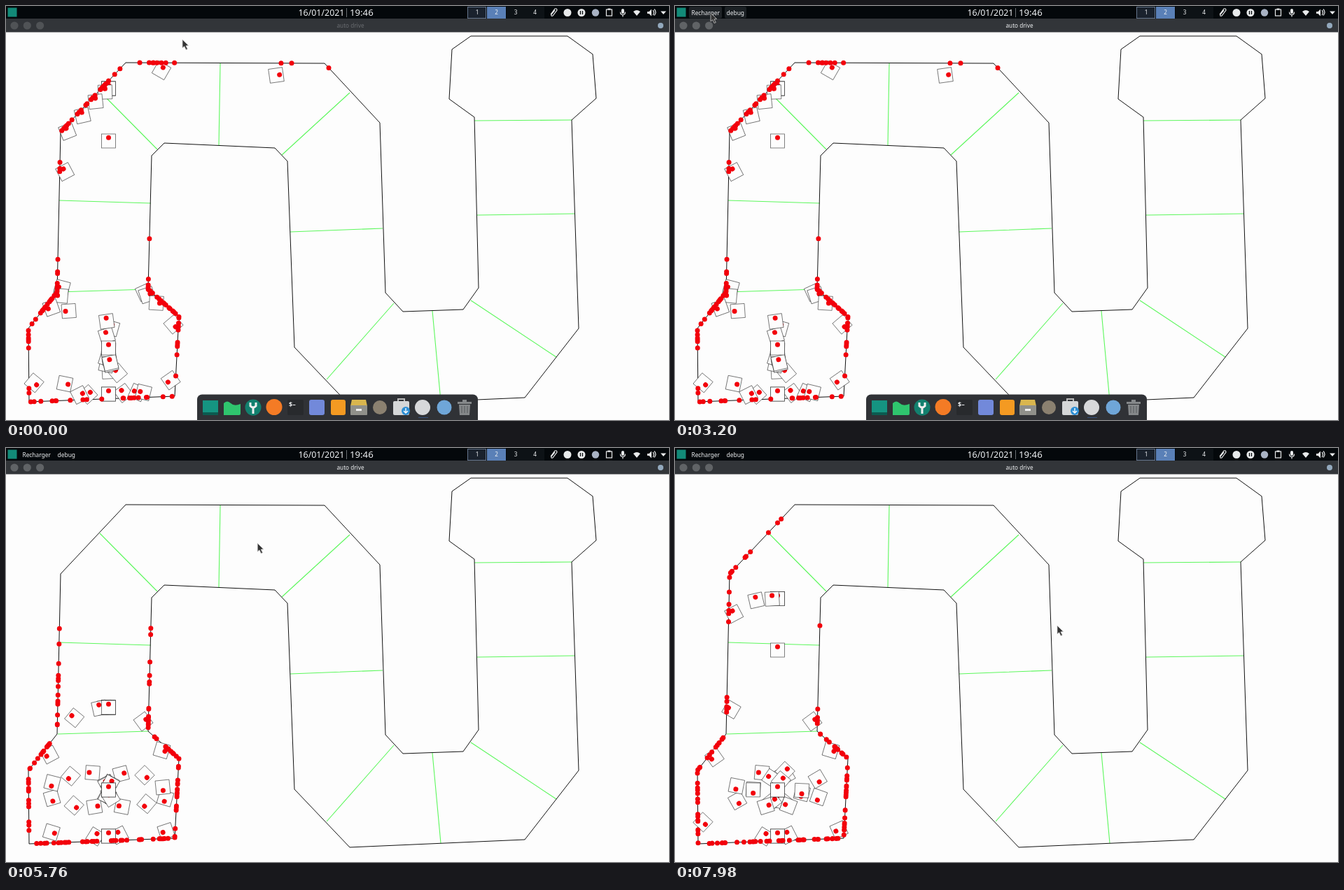
Animation of 947 by 592 pixels, one loop 8 s. Source, as an HTML page:

```html
<!DOCTYPE html>
<html lang="fr">
<head>
<meta charset="utf-8">
<title>auto drive</title>
<style>
  html, body { margin: 0; width: 100%; height: 100%; overflow: hidden; background: #fdfdfd; }
  svg { display: block; width: 100%; height: 100%; }
  text { font-family: "Noto Sans", "Open Sans", sans-serif; fill: #eef0f2; }
  .mid { text-anchor: middle; }
  .car rect { fill: #fdfdfd; stroke: #000; stroke-opacity: .62; stroke-width: .8; }
  .car circle { fill: #f2000b; }
</style>
</head>
<body>
<svg viewBox="0 0 947 592">
  <rect width="947" height="592" fill="#fdfdfd"/>
  <path id="gates" fill="none" stroke="#5cf75c" stroke-width="1.1"/>
  <path id="walls" fill="none" stroke="#111"/>
  <g id="cars" class="car"></g>
  <path id="hits" fill="none" stroke="#f2000b" stroke-width="7" stroke-linecap="round"/>

  <g id="dock">
    <rect x="273" y="555.5" width="401" height="44" rx="7" fill="#303236"/>
    <rect x="281" y="564" width="22" height="21" fill="#159481"/>
    <rect x="281" y="581" width="22" height="4" fill="#0c5b50"/>
    <path d="M311 585V568q5-5 10 0t14 1v14q0 2-2 2z" fill="#2fc56e"/>
    <circle cx="353" cy="574" r="11.5" fill="#12806e"/>
    <path d="M349 567v5q4 4 8 0v-5M353 574v9" fill="none" stroke="#eee" stroke-width="3"/>
    <circle cx="383" cy="573.5" r="11.5" fill="#f47b25"/>
    <rect x="402" y="563" width="23" height="22" rx="2" fill="#282a2d"/>
    <text x="404" y="573" font-size="9" font-weight="700">$–</text>
    <rect x="433" y="563" width="22" height="22" rx="3" fill="#7289da"/>
    <rect x="464" y="563" width="21" height="22" rx="3" fill="#f49a22"/>
    <path d="M494 563h20l2 9h-24z" fill="#d9b64e"/>
    <rect x="492" y="571" width="24" height="14" rx="1" fill="#90908a"/>
    <rect x="500" y="576" width="8" height="3" fill="#eee"/>
    <circle cx="534" cy="574" r="10" fill="#8b8170"/>
    <path d="M560 566v-4h9v4" fill="none" stroke="#bbb" stroke-width="2"/>
    <rect x="553" y="565" width="23" height="20" rx="2" fill="#d5d7d8"/>
    <circle cx="571" cy="579" r="6" fill="#2d8fd5"/>
    <path d="M571 575v7m-3-3 3 3 3-3" fill="none" stroke="#fff" stroke-width="1.4"/>
    <circle cx="595" cy="574" r="11" fill="#d7d8da"/>
    <circle cx="626" cy="574" r="10.5" fill="#6fa6d8"/>
    <path d="M645 566h20v3h-20zM652 563h6v3h-6zM647 570h16l-1 15h-14z" fill="#85888a"/>
    <path d="M651 572v10m4-10v10m4-10v10" stroke="#55585a"/>
    <path d="M589 588.5h14" stroke="#35507c"/>
  </g>

  <rect width="947" height="18.5" fill="#04080b"/>
  <rect y="18" width="947" height="19.5" fill="#323539"/>
  <g id="lights">
    <circle cx="12" cy="28" r="5.6"/><circle cx="30.3" cy="28" r="5.6"/><circle cx="48.6" cy="28" r="5.6"/>
  </g>
  <text id="title" class="mid" x="492" y="30.5" font-size="8.2">auto drive</text>
  <circle cx="935" cy="28" r="4" fill="#93a9bd"/>

  <rect x="2.5" y="2.5" width="13" height="13" fill="#128a78"/>
  <g id="menu" font-size="8.4">
    <rect id="hotA" x="20" y="1" width="47" height="16.5" rx="2" fill="#30353a"/>
    <rect id="hotB" x="71" y="1" width="31" height="16.5" rx="2" fill="#30353a"/>
    <text class="mid" x="43.7" y="12.5">Recharger</text>
    <text class="mid" x="86.3" y="12.5">debug</text>
  </g>
  <text x="417.5" y="14.2" font-size="12.4">16/01/2021</text>
  <text x="491" y="14.2" font-size="13.2">19:46</text>
  <path d="M486.5 3v13" stroke="#85898c" stroke-width=".8"/>
  <rect x="659.5" y="1.5" width="26" height="16" fill="#1a222d" stroke="#65758c"/>
  <rect x="687" y="1" width="27" height="17" fill="#5a80b7"/>
  <rect x="715" y="1" width="54" height="17" fill="#0d1216"/>
  <g class="mid" font-size="8.2">
    <text x="673" y="12.3">1</text><text x="700.5" y="12.3">2</text><text x="728" y="12.3">3</text><text x="755.5" y="12.3">4</text>
  </g>
  <g fill="none" stroke="#e8eaeb" stroke-width="1.2">
    <path d="M778 12l6-8q3-1 3 2l-6 8q-3 1-2-2l5-6"/>
    <rect x="857.5" y="5" width="8" height="9"/><path d="M859.5 4.5h4" stroke-width="2"/>
    <path d="M877.5 8.5q0 4 3.5 4t3.5-4M881 12.5v3"/>
    <path d="M924 6q3 3.5 0 7M926 4.5q4 4.5 0 9"/>
  </g>
  <g fill="#e8eaeb">
    <circle cx="802" cy="9.5" r="5.5"/>
    <circle cx="822" cy="9.5" r="5.5"/>
    <circle cx="842" cy="9.5" r="5.2" fill="#a9b3c4"/>
    <rect x="879" y="4" width="4" height="7" rx="2"/>
    <path d="M896 8q5-4 10 0l-5 6zM916 8h2.5l3.500-3.500v10l-3.500-3.500h-2.500zM935 7.500h8l-4 4.500z"/>
  </g>
  <path d="M820.5 7v5m3-5v5" stroke="#04080b" stroke-width="1.3"/>

  <path id="mouse" d="M0 0v12l2.700-2.300 2.400 4.800 2.200-1-2.400-4.600 3.700-.4z" fill="#333" stroke="#ccc" stroke-width=".8"/>
</svg>
<script>
const $ = id => document.getElementById(id);
const LOOP = 8000, RELOAD = 4075, SPEED = 70, RAD = Math.PI / 180;
const RANGE = 138;      // sensor length
const CLEARANCE = 7.5;  // a car this close to a wall has crashed
const START = [146.5, 489];

const track = [
  [33, 566], [32, 461], [73, 409], [78, 180], [171, 81], [455, 82], [534, 167], [542, 410],
  [567, 437], [653, 434], [675, 403], [669, 159], [633, 133], [637, 62], [664, 43], [802, 43],
  [838, 69], [843, 132], [808, 163], [818, 461], [741, 560], [491, 571], [412, 488], [402, 222],
  [384, 203], [226, 196], [208, 214], [203, 405], [247, 444], [241, 558]
];
const walls = track.map((a, i) => [...a, ...track[(i + 1) % track.length]]);
const gates = [
  "74 409L203 405", "76 278L207 282", "134 122L216 205", "306 82L304 199", "491 124L394 213",
  "406 323L538 318", "554 425L458 534", "609 436L621 565", "664 421L786 502", "673 299L812 297",
  "669 164L808 163"
];

const clamp = v => Math.max(0, Math.min(1, v));
const ramp = (t, a, b) => clamp((t - a) / (b - a));
const smooth = k => k * k * (3 - 2 * k);

let seed = 7;
const random = () => (seed = seed * 16807 % 2147483647) / 2147483647;
const spread = size => (random() * 2 - 1) * size;

function wallGap(x, y) {
  return Math.min(...walls.map(([ax, ay, bx, by]) => {
    const ex = bx - ax, ey = by - ay;
    const k = clamp(((x - ax) * ex + (y - ay) * ey) / (ex * ex + ey * ey));
    return Math.hypot(ax + ex * k - x, ay + ey * k - y);
  }));
}

// Every car keeps one steering angle, so it follows an arc from the start.
function pose(car, dist) {
  const len = Math.min(dist, car.reach), half = car.bend * len / 2;
  const chord = car.dir * (half ? len * Math.sin(half) / half : len);
  return [START[0] + chord * Math.sin(half), START[1] - chord * Math.cos(half), 2 * half / RAD];
}

// turn: degrees per 66 px; dir: 1 forward, -1 reverse
function makeCar(turn, dir = 1, reach = 420) {
  const car = { bend: turn * RAD / 66, dir, reach };
  for (let d = 0; d < reach; d++) {
    const [x, y] = pose(car, d);
    if (wallGap(x, y) < CLEARANCE) { car.reach = d; break; }
  }
  return car;
}

function fan(first, step, count) {
  const cars = [];
  for (const dir of [-1, 1]) {
    for (const side of [-1, 1]) {
      for (let i = 0; i < count; i++) cars.push(makeCar(side * (first + step * i + spread(5)), dir));
    }
    cars.push(makeCar(0, dir), makeCar(0, dir));
  }
  return cars;
}

// cars that go up the road, drifting more and more to the left
const scouts = count => Array.from({ length: count }, (_, i) => makeCar(-7 * (i / (count - 1)) ** 2));
const idlers = count => Array.from({ length: count }, () =>
  makeCar(spread(90), random() < .5 ? 1 : -1, random() * 42));
const straight = reach => makeCar(0, 1, reach);

const oldCars = [...fan(40, 10, 4), ...scouts(6), straight(296), ...idlers(11), straight(0)];
const newCars = [...fan(31, 31, 7), ...scouts(4), straight(200), straight(0), straight(0)];
const pioneers = [[222, 92, 30], [386, 99, 82]];
const parked = [...oldCars.map(c => pose(c, Infinity)), ...pioneers];

function castRay(x, y, deg) {
  const ux = Math.sin(deg * RAD), uy = -Math.cos(deg * RAD);
  let best = RANGE;
  for (const [ax, ay, bx, by] of walls) {
    const ex = bx - ax, ey = by - ay, det = ux * ey - uy * ex;
    const t = ((ax - x) * ey - (ay - y) * ex) / det;
    const k = ((ax - x) * uy - (ay - y) * ux) / det;
    if (t > 0 && t < best && k >= 0 && k <= 1) best = t;
  }
  return best < RANGE ? `M${x + ux * best} ${y + uy * best}h.01` : "";
}

function drawCars(poses) {
  let boxes = "", hits = "";
  for (const [x, y, h] of poses) {
    boxes += `<g transform="translate(${x} ${y}) rotate(${h})">
      <rect x="-10" y="-10" width="20" height="20"/><circle cy="-4.7" r="3.5"/></g>`;
    for (let ray = -60; ray <= 60; ray += 30) hits += castRay(x, y, h + ray);
  }
  $("cars").innerHTML = boxes;
  $("hits").setAttribute("d", hits);
}

// time, x, y
const mousePath = [
  [0, 252, 48], [1000, 282, 39], [1900, 282, 38], [2900, 88, 11], [3200, 51, 10],
  [3400, 48, 9], [5080, 48, 9], [5760, 359, 136], [6500, 546, 254], [LOOP, 546, 254]
];

function mouseAt(t) {
  const i = mousePath.findIndex(p => p[0] > t);
  const [t0, x0, y0] = mousePath[i - 1], [t1, x1, y1] = mousePath[i];
  const k = ramp(t, t0, t1);
  return [x0 + (x1 - x0) * k, y0 + (y1 - y0) * k];
}

function render(t) {
  const dist = (t - RELOAD) / 1000 * SPEED;
  drawCars(dist < 0 ? parked : newCars.map(c => pose(c, dist)));

  const focused = t >= 2000;
  $("title").style.fill = focused ? "#eef0f2" : "#696c70";
  $("lights").setAttribute("fill", focused ? "#606366" : "#505356");
  $("menu").setAttribute("opacity", focused ? 1 : 0);
  $("hotA").setAttribute("opacity", ramp(t, 3080, 3280) * (1 - ramp(t, 5090, 5250)));
  $("hotB").setAttribute("opacity", ramp(t, 2780, 2950) * (1 - ramp(t, 3120, 3300)));
  $("dock").setAttribute("transform", `translate(0 ${40 * smooth(ramp(t, 4300, 4600))})`);
  $("mouse").setAttribute("transform", `translate(${mouseAt(t)})`);
}

$("walls").setAttribute("d", "M" + track.join("L") + "Z");
$("gates").setAttribute("d", "M" + gates.join("M"));

const begin = performance.now();
function tick() {
  render((performance.now() - begin) % LOOP);
  requestAnimationFrame(tick);
}
tick();
</script>
</body>
</html>
```
